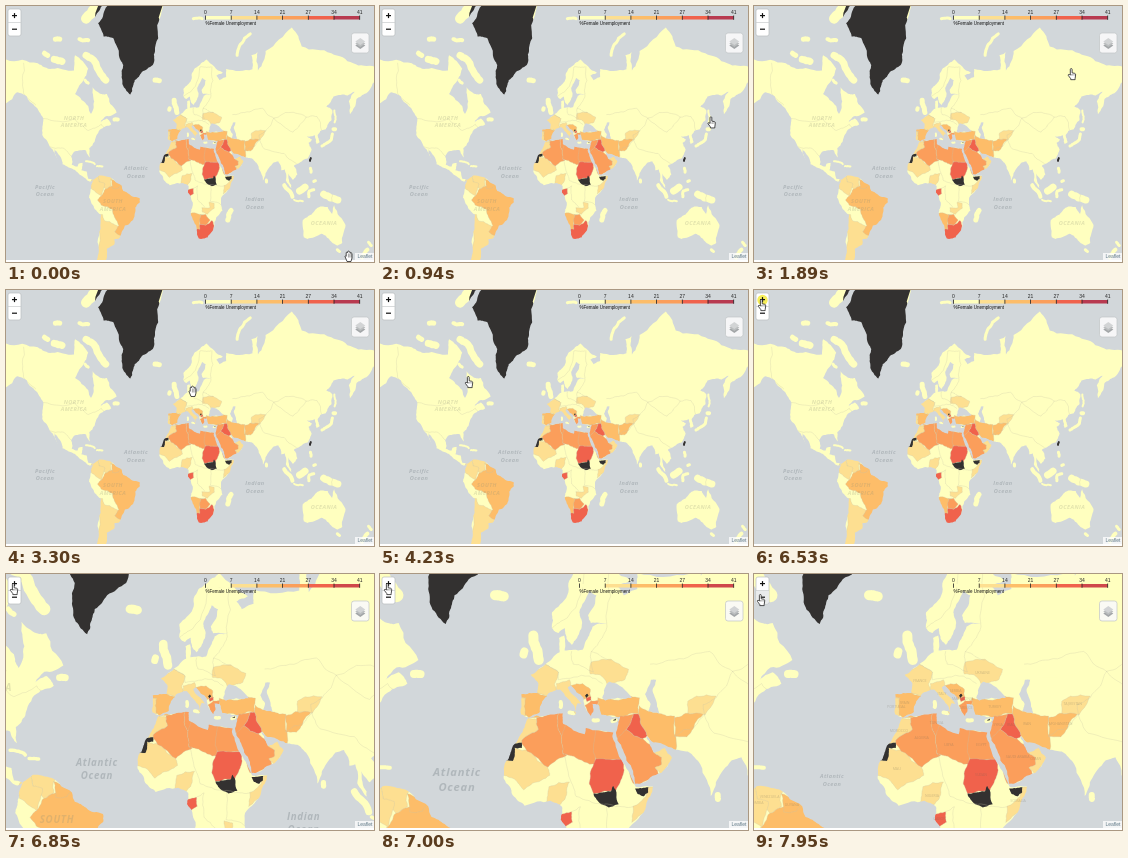
An HTML page with a canvas for the animation above (8 s loop, 368 px wide and 256 px high).

```html
<!DOCTYPE html>
<html lang="en">
<head>
<meta charset="utf-8">
<title>Female unemployment map</title>
<style>
html, body { margin: 0; width: 100%; height: 100%; overflow: hidden; background: #fff; }
canvas { display: block; width: 368px; height: 256px; }
</style>
</head>
<body>
<canvas id="stage" width="368" height="256"></canvas>
<script>
const ctx = document.getElementById('stage').getContext('2d');
const LOOP = 8000, CX = 183, CY = 127;
const WATER = '#d2d7da', INK = '#333130';
const LOW = '#ffffbf', PALE = '#fddf91', AMBER = '#fdbd69', ORANGE = '#fb9e5b', RED = '#f0624c';

// Key points are longitude,latitude; edges between them are roughened by rule.
const land = {
  northAmerica: '-168,66 -157,71 -128,70 -115,68.5 -95,68 -94,72 -82,68.5 -87,64.5 -94,60 -82,55 -79.5,51.3 -76.5,57 -78,62.5 -70,60 -65,60 -56,52 -66,50.2 -71,47 -65,49 -61,46 -70,43.5 -76,36 -81,31.7 -80.3,25.3 -84,30 -94.5,29.4 -97.5,26 -97,20 -92,18.6 -90.5,21 -87,21.4 -88.2,16 -83.3,15 -82,9.5 -77.4,8.5 -80,7.3 -85.8,10.5 -94,16.1 -105.5,20.3 -106,23 -113,31 -109.5,23 -117,32.5 -124,40 -123,49 -131,55 -138,59 -147,60.7 -158,56 -165,61',
  greenland: '-73,78.3 -68,76 -59,75.7 -54,72 -50,69.5 -51.5,66 -49.5,62.5 -43.5,59.8 -41.5,62.5 -39.5,65 -33,67.5 -23,69.5 -21,73 -19,78 -12,81.7 -30,84 -50,83 -66,80.5',
  southAmerica: '-77.4,8.5 -72,12 -62,10.6 -51.5,4.2 -50,0 -44,-2.7 -35.2,-5.5 -35,-9 -39,-13 -41,-22 -48.5,-26 -54,-34.7 -58,-35 -58,-38.2 -65,-41 -66,-49 -74.5,-49 -73.5,-37 -70.3,-18.4 -76,-14 -81.3,-5 -80,.8',
  africa: '-5.9,35.8 10,37.3 10.2,34 20,30.6 20.5,32.7 33,31.2 32.6,29.8 37.3,20.8 43.2,11.7 51.2,11.8 48,4.5 39.5,-5 40.6,-15 35,-20 32.5,-28 27,-34 19,-34.7 14.5,-23 11.8,-16 13.5,-9 9,-1 9.6,4 4.3,6.3 -7.5,4.4 -13,8.5 -17,14.7 -16.5,20.5 -14,24 -12.5,27 -9.7,30',
  europe: '-9,37 -9,43 -1.7,43.4 -1.2,46 -4.7,48.3 2,51 8.5,53.8 8.2,57 10.6,57.5 10.8,54.2 19,54.4 22,57.5 23.5,59.3 30,60 40,60 50,50 50,46.5 47.5,43 50,40.3 49,38 44,36.5 36,36.3 30.5,36.5 27.5,37 26.2,40 23.5,40.3 24,38 22.8,36.5 19.4,41 19.4,42 13.6,45.5 12.3,45 13.5,43.5 18.4,40.2 16.8,40.4 15.8,38 12.2,41.8 8.7,44.4 3.2,43.2 0,40 -.5,37.8 -5.5,36',
  scandinavia: '5,59 5,62 12,65 15,68.5 21,70 26,71 41,67.3 35,66.4 40,63 30,60 22.8,60 21.5,61.5 25.3,65 22,65.7 17.5,62 18.8,60 16.5,57 14.2,55.5 12.5,56.2 11,59 8,58',
  siberia: '30,60 35,64 44,66 44,68.4 68,68.3 67,72 72.7,72.7 73,68 80,73 104,77.6 113,74 140,72.5 160,70 180,69 180,65 170,60 163,58 162,55 157,51.2 156,57 163,61.5 155,59.4 142,59 135.5,54.8 141,53 140,48 135,43.3 127.5,42 60,45 53,47 47,47 30,55',
  southAsia: '53,48 51,44.5 53,40 54,37.3 61,30 61.6,25.2 67,24.7 72.8,20 77.5,8.1 80.2,14 87,21.5 91.5,22.6 94.3,16 97.5,16.5 98.5,8.3 104,1.4 103.5,4.5 100.5,13.5 105,8.7 109,13 105.8,19 110,21 118,24.4 122,31 119.2,35 122.5,37 117.8,39 125,39.7 126.4,34.5 129.3,35.5 127.5,39.7 131,43.5 100,55',
  arabia: '36,37 46,38.5 49,38 54,37.3 61,36 62,25.2 57,26.8 51.5,27.8 48,30 50.5,26 51.5,24.3 56.3,26 59.8,22.5 55,17 45,12.8 43,12.8 39,21.5 34.9,28.5 34.2,31.2 36,35.8',
  australia: '114,-22 122,-18 130,-12 136.8,-12.3 140.8,-17.5 142.5,-10.8 146,-18 153,-25.5 150,-37.3 146,-39 138,-35 131,-31.5 118,-35 115,-34'
};
const blackSea = '28,42 28.7,44 31,46.5 36.5,45.2 41.5,42 35,42 29.5,41.2';

// Islands are thick strokes, grouped by width in pixels.
const islands = {
  10: ['-84,79 -70,82'],
  7: ['-84,72 -75,70 -66,65', '-113,71 -106,70.5', '111,0 116,3', '133,-2.5 146,-7'],
  5: ['-122,72.5 -119,72', '-21,65 -17,64.8', '45.5,-22 48.5,-15', '-3.5,57.5 -1,52', '-112,75.5 -108,75.5'],
  4: ['-90,75.5 -82,75.3', '-58,48.5 -55,48.5', '-8,53.3 -7.6,54', '97,4.5 104.5,-4.5', '168,-46 173,-41.5', '142,43.3 143.5,43.3'],
  3: ['-85,65 -82,64', '14,79 22,79', '54,72 57,74.5 66,76.5', '131.5,33 136,35 140,37 141,40.5', '121,17.5 121.5,14.5', '124,7.5 125.5,8', '119.5,-4.5 120,0 124,1', '174,-37 176.5,-39', '145.5,-41.5 147.5,-42.5', '80.7,8.5 80.8,7'],
  2: ['-84,22.5 -76,20.5', '-74,19 -69,18.8', '142.8,53 143,47', '106,-6.8 114,-8', '9,40.8 9,39.3', '13,37.6 15,37.4', '24,35.2 26,35.2', '32.6,34.9 34.2,35.2', '120.5,22.8 121.3,24.8']
};

// Areas may run into the sea: they are painted only where there is land.
const countries = {
  [PALE]: {
    ARGENTINA: '-72,-18 -69,-18 -67,-22.5 -57.6,-25.5 -54,-26.5 -57.6,-30 -50,-34 -60,-50 -78,-50',
    VENEZUELA: '-73,13 -60,13 -61,4 -66,1 -72,7',
    COLOMBIA: '-79,8 -73,13 -72,7 -67,6 -70,-4 -79,1.5',
    MALI: '-18,21 -13,21.3 -12,26 -5,25 3,19 4,16 -4,13 -8,10.5 -12,14.5 -18,16',
    MOROCCO: '-6,36 -2,35.5 -1.2,32.2 -8.7,28.7 -8.7,27.7 -14,27.7 -11,33',
    NIGERIA: '2.7,5 3.6,11.7 13,13.5 11,7 8.5,4',
    SOMALIA: '41.5,-2 50,3 52,12 48.9,11.4 48,8 42,4.2',
    ZAMBIA: '22,-13 29,-13 28.5,-8.5 33,-9.5 33,-13.5 27,-17.8 22,-16',
    PORTUGAL: '-10,42 -7,42 -7,36.5 -10,36',
    FRANCE: '-6,48 -1.5,49.6 2,51 8,49 6.2,46 7.5,43 3,42.4 -1.7,43.4',
    ITALY: '7,44 7,46 13,47 14,45 19,40 16,37 10,42',
    UKRAINE: '23,51.5 32,52.2 40,49.7 38.2,47 33,46 30.5,45.5 27,48.3 22.5,48.5',
    TAJIKISTAN: '67,37 67,41 71,42.5 80,42.5 75,37',
    OMAN: '51.5,24.3 56.3,27 61,22.5 55,16 52,19 55,22.6'
  },
  [AMBER]: {
    BRAZIL: '-52,6 -30,0 -30,-20 -50,-34.5 -57.6,-30 -54,-26 -58,-20 -60,-14 -70,-11 -73.5,-7 -70,-4 -67,1 -60,4 -56,2.3',
    GUYANA: '-61,9 -50,6 -54,2.3 -60,2',
    SPAIN: '-10,44 -1.7,43.4 3.5,42.4 0,36.5 -5.5,35.9 -7.3,37 -7,42 -10,42',
    SERBIA: '13.6,45.4 19,46 22.5,44.5 22.8,42.3 19.5,41.5 14,43.5',
    TURKEY: '26,42 41,42.5 45,42 44.5,37.2 36,36 26,36.5',
    IRAN: '44.8,39.7 49,38 54,37.3 61,36.5 61.6,25 51,27 48.5,30 45.5,34 44.5,37.2',
    AFGHANISTAN: '61,36 66,37.4 74,37 70,33.5 66.5,29.7 61,29.8',
    NAMIBIA: '10,-17.2 23.5,-17.8 20.9,-18.3 20,-28.5 14,-28.6'
  },
  [ORANGE]: {
    ALGERIA: '-2,36 8.5,38 7.5,33.5 9.5,30.2 10,24 12,23.5 3.2,19 -8.7,27.3 -8.7,28.7 -1.2,32.2',
    TUNISIA: '8.5,38 12,37 11.5,32.5 9.5,30.2 7.5,33.5',
    LIBYA: '11.5,34 25,33 25,20 15,23 12,23.5 10,24 9.5,30.2',
    EGYPT: '25,32 34.5,32 36.9,22 25,22',
    SYRIA: '36,36.5 42.4,37.2 41,34.5 39,32.2 35,29 34,31.5',
    'SAUDI ARABIA': '34.9,29.5 39,32.2 46.5,29.1 52,26 51.5,24.3 55,22.6 55,20 52,19 54,16 45,12 42,13 36,25',
    GREECE: '20,39.7 23,41.2 26.2,41.2 25,37 22,35.8',
    BOTSWANA: '20.9,-18.3 25.2,-17.8 29.4,-22.2 25.5,-25.7 20,-25'
  },
  [RED]: {
    IRAQ: '42.4,37.2 44.5,37.2 45.5,34 48.5,30 46.5,29.1 39,32.2 41,34.5',
    SUDAN: '25,22 37.5,22 38,18 36.5,14.3 34,10 24,9 22,13 24,20',
    GABON: '9,1 14,2 14.4,-2 11,-3.9 8,-1',
    'SOUTH AFRICA': '15,-28.6 20,-28.5 20,-25 25.5,-25.7 31,-22.3 33,-26 28,-36 17,-36',
    MACEDONIA: '20.5,42 22.8,42.3 22.8,41.3 20.9,40.9'
  },
  [INK]: {
    GREENLAND: '-75,85 -74,77 -60,74 -54,60 -40,59 -16,70 -5,84',
    'SOUTH SUDAN': '24,9 28,9.5 32,10 33,12 35.5,5 31,3.7 27.5,5',
    SOMALILAND: '43,11 49,11.5 48.9,9.5 47,8 44,9',
    'WESTERN SAHARA': '-14,27.7 -8.7,27.7 -8.7,26 -12,26 -12,23.4 -13,21.3 -18,21',
    KOSOVO: '20.1,42.6 21,43.2 21.7,42.6 20.7,42',
    CYPRUS: '32.8,35.1 34.5,36 34,35.1',
    TAIWAN: '119,22 122,21 123,26 120,25.5'
  }
};

const borders = [
  '-141,70 -141,60.3 -130,55.5', '-123,49 -95,49 -82,42.5 -70,46 -67,44', '-117,32.5 -106,31.8 -97.4,26',
  '50,51 61,52 77,54 87.5,49.2 98,52 117,49.7 127,50 131,43', '87.5,49.2 80,42 74,40 79,31 97,28 108,21',
  '87.5,49.2 105,41.6 117,49.7', '61,30 70,33 75,37', '5,59 12,61 20,69 30,69', '23,54 28,57 30,60 31,69',
  '14,54 14.7,51 24,49 23,54 32,52', '2,51 8,49 8,47 22,48 28,46', '10,24 14,13 16,8 28,5 34,4 42,4',
  '14,2 18,4 18,-7 24,-12', '30,4 29.5,-8 40,-11', '141,-2 141,-9'
];

const mercator = lat => Math.log(Math.tan(Math.PI / 4 + lat * Math.PI / 360)) * 180 / Math.PI;
const project = pair => {
  const [lon, lat] = pair.split(',').map(Number);
  return [172 + 1.095 * lon, 185 - 1.285 * mercator(lat)];
};

// Midpoint displacement seeded by the edge itself, so neighbours share the same border.
function roughen(a, b, depth = 3) {
  if (!depth) return [b];
  const noise = Math.sin((a[0] + b[0]) * 12.9 + (a[1] + b[1]) * 78.2) * 4375.8;
  const shift = (noise - Math.floor(noise) - .5) * .2 * (a[0] < b[0] ? 1 : -1);
  const mid = [(a[0] + b[0]) / 2 + (b[1] - a[1]) * shift, (a[1] + b[1]) / 2 - (b[0] - a[0]) * shift];
  return [...roughen(a, mid, depth - 1), ...roughen(mid, b, depth - 1)];
}

function trace(points, closed) {
  const keys = points.split(' ').map(project);
  if (closed) keys.push(keys[0]);
  const path = new Path2D();
  path.moveTo(...keys[0]);
  for (let i = 1; i < keys.length; i++)
    for (const point of roughen(keys[i - 1], keys[i])) path.lineTo(...point);
  return path;
}

function middle(points) {
  const keys = points.split(' ').map(project);
  return [0, 1].map(axis => keys.reduce((sum, key) => sum + key[axis], 0) / keys.length);
}

const landPaths = Object.values(land).map(points => trace(points, true));
const seaPath = trace(blackSea, true);
const islandPaths = Object.entries(islands).flatMap(([width, list]) =>
  list.map(points => ({ width: +width, path: trace(points, false) })));
const areas = Object.entries(countries).flatMap(([color, group]) =>
  Object.entries(group).map(([name, points]) => ({ name, color, path: trace(points, true), at: middle(points) })));
const borderPaths = borders.map(points => trace(points, false));

const POINTER = new Path2D('M-1.6 1V-4.6a.9.9 0 0 1 1.8 0V-1.2l2.6.5q1 .3.9 1.5L3.2 4.6V5.6h-4.4V4.6L-3.6 1.4q-.3-1.2.8-1z');
const OPEN_HAND = new Path2D('M-2 5.5L-4 .5q.2-1 1.2-.2V-3.4q.8-1 1.4 0v-1q.8-1 1.5 0v.6q.9-.8 1.5.2v.8q.9-.6 1.4.3V2L2 5.5z');
const cursorTrack = [
  [0, 343, 250], [50, 343, 250], [860, 330, 121], [1710, 347, 72], [1890, 318, 68],
  [2520, 262, 108], [3300, 187, 101], [3400, 187, 101], [3800, 142, 133], [4230, 89, 92],
  [4300, 89, 92], [5120, 8, 18], [5360, 8, 15], [7720, 8, 15], [7950, 7, 26], [LOOP, 7, 26]
];

const clamp = v => Math.max(0, Math.min(1, v));

// cubic-bezier(0, 0, .25, 1), solved by bisection
function zoomEase(x) {
  let lo = 0, hi = 1;
  for (let i = 0; i < 20; i++) {
    const s = (lo + hi) / 2;
    if (.75 * s * s + .25 * s ** 3 < x) lo = s; else hi = s;
  }
  return 3 * lo * lo - 2 * lo ** 3;
}

function text(str, x, y, font, color, align = 'center', spacing = 0) {
  ctx.font = font;
  ctx.fillStyle = color;
  ctx.textAlign = align;
  ctx.textBaseline = 'middle';
  ctx.letterSpacing = spacing + 'px';
  ctx.fillText(str, x, y);
}

function mapLabel(words, x, y, color = '#b0b7bb') {
  words.split(' ').forEach((word, i) =>
    text(word, x, y + i * 7.4, 'italic bold 5.6px "Open Sans", sans-serif', color, 'center', .4));
}

function box(x, y, w, h, r, fill, stroke) {
  ctx.beginPath();
  ctx.roundRect(x, y, w, h, r);
  ctx.fillStyle = fill;
  ctx.fill();
  if (!stroke) return;
  ctx.strokeStyle = stroke;
  ctx.lineWidth = .7;
  ctx.stroke();
}

function drawLand(scale) {
  ctx.lineJoin = ctx.lineCap = 'round';
  ctx.fillStyle = ctx.strokeStyle = LOW;
  landPaths.forEach(path => ctx.fill(path));
  for (const { width, path } of islandPaths) {
    ctx.lineWidth = width;
    ctx.stroke(path);
  }
  ctx.globalCompositeOperation = 'destination-out';
  ctx.fill(seaPath);
  ctx.globalCompositeOperation = 'source-atop';
  ctx.lineWidth = .6 / scale;
  ctx.strokeStyle = 'rgba(200,195,165,.45)';
  for (const { color, path } of areas) {
    ctx.fillStyle = color;
    ctx.fill(path);
    if (color !== INK) ctx.stroke(path);
  }
  borderPaths.forEach(path => ctx.stroke(path));
  ctx.globalCompositeOperation = 'destination-over';
  ctx.fillStyle = WATER;
  ctx.fillRect(0, 0, 368, 256);
  ctx.globalCompositeOperation = 'source-over';
}

function drawMap(scale, detail) {
  ctx.save();
  ctx.translate(CX, CY);
  ctx.scale(scale, scale);
  ctx.translate(-CX, -CY);
  drawLand(scale);
  ctx.globalAlpha = 1 - detail;
  mapLabel('Atlantic Ocean', 130, 163);
  mapLabel('Pacific Ocean', 39, 181.5);
  mapLabel('Indian Ocean', 249, 194);
  const faint = 'rgba(140,145,120,.25)';
  mapLabel('NORTH AMERICA', 68, 112.5, faint);
  mapLabel('SOUTH AMERICA', 107, 196, faint);
  mapLabel('OCEANIA', 318, 218, faint);
  ctx.restore();

  ctx.save();
  ctx.globalAlpha = detail;
  mapLabel('Atlantic Ocean', 78, 203);
  for (const { name, color, at: [x, y] } of areas)
    if (color !== INK) text(name, CX + (x - CX) * 2, CY + (y - CY) * 2, '3.6px "Open Sans", sans-serif', 'rgba(110,105,90,.3)');
  ctx.restore();
}

function drawLegend(zoomed) {
  const colors = [LOW, PALE, AMBER, ORANGE, RED, zoomed ? '#cf484b' : '#b83a50'];
  const left = 199.5, step = 25.7;
  colors.forEach((color, i) => {
    ctx.fillStyle = color;
    ctx.fillRect(left + i * step, 10, step, 3.5);
  });
  [0, 7, 14, 21, 27, 34, 41].forEach((value, i) => {
    const x = left + i * step;
    ctx.fillStyle = '#222';
    ctx.fillRect(x - .4, 9.5, .8, 4.3);
    text(value, x, 6.3, '5px "Liberation Sans", sans-serif', '#222');
  });
  text('%Female Unemployment', 199.5, 17.4, '4.5px "Liberation Sans", sans-serif', '#111', 'left');
}

function drawLayersButton() {
  box(345.5, 27, 17.5, 20, 2.5, 'rgba(250,250,250,.9)', '#c0c4c6');
  ['#a3a6a8', '#bbbebf', '#d2d4d5'].forEach((color, i) => {
    const y = 39.5 - i * 2;
    ctx.beginPath();
    ctx.moveTo(354.3, y - 3.6);
    ctx.lineTo(359.3, y);
    ctx.lineTo(354.3, y + 3.6);
    ctx.lineTo(349.3, y);
    ctx.fillStyle = color;
    ctx.fill();
  });
}

function drawZoomButtons(t) {
  box(2, 3, 13, 27, 2, '#fff', '#b9bdbf');
  if (t >= 7850) box(2.5, 16.5, 12, 13, 1.5, '#e9ebec');
  ctx.fillStyle = '#c9cccd';
  ctx.fillRect(2, 16, 13, .7);
  if (t >= 6530 && t < 6750) box(3.3, 4.8, 10.4, 10.4, 5.2, '#f6ee58');
  ctx.fillStyle = '#111';
  ctx.fillRect(6, 9, 5, 1.2);
  ctx.fillRect(7.9, 7.1, 1.2, 5);
  ctx.fillRect(6, 22.6, 5, 1.2);
  if (t >= 5910 && t < 6530) {
    box(12, 20, 25.5, 8.5, 0, '#fff', '#888');
    text('Zoom in', 24.8, 24.4, '5.2px "Liberation Sans", sans-serif', '#444');
  }
}

function drawCursor(t) {
  const next = cursorTrack.findIndex(key => key[0] > t);
  const [t0, x0, y0] = cursorTrack[next - 1], [t1, x1, y1] = cursorTrack[next];
  const p = (t - t0) / (t1 - t0);
  const open = t < 650 || (t > 3200 && t < 3500);
  const hand = open ? OPEN_HAND : POINTER;
  ctx.save();
  ctx.translate(x0 + (x1 - x0) * p, y0 + (y1 - y0) * p);
  ctx.fillStyle = '#fff';
  ctx.fill(hand);
  ctx.strokeStyle = '#222';
  ctx.lineWidth = .8;
  ctx.stroke(hand);
  ctx.beginPath();
  for (const x of [-.6, .8, 2.2]) {
    ctx.moveTo(x, open ? -2.5 : 0);
    ctx.lineTo(x, 1.5);
  }
  ctx.lineWidth = .4;
  ctx.stroke();
  ctx.restore();
}

function frame(now) {
  const t = Math.max(0, now) % LOOP;
  const zoom = zoomEase(clamp((t - 6750) / 250));
  ctx.clearRect(0, 0, 368, 256);
  drawMap(1 + zoom, clamp((t - 7150) / 300));
  drawLegend(t >= 6750);
  drawZoomButtons(t);
  drawLayersButton();
  box(349, 247, 19, 7, 0, 'rgba(255,255,255,.75)');
  text('Leaflet', 366.5, 250.7, '5px "Liberation Sans", sans-serif', '#5f7886', 'right');
  ctx.fillStyle = '#fff';
  ctx.fillRect(0, 254, 368, 2);
  drawCursor(t);
  requestAnimationFrame(frame);
}
requestAnimationFrame(frame);
</script>
</body>
</html>
```
